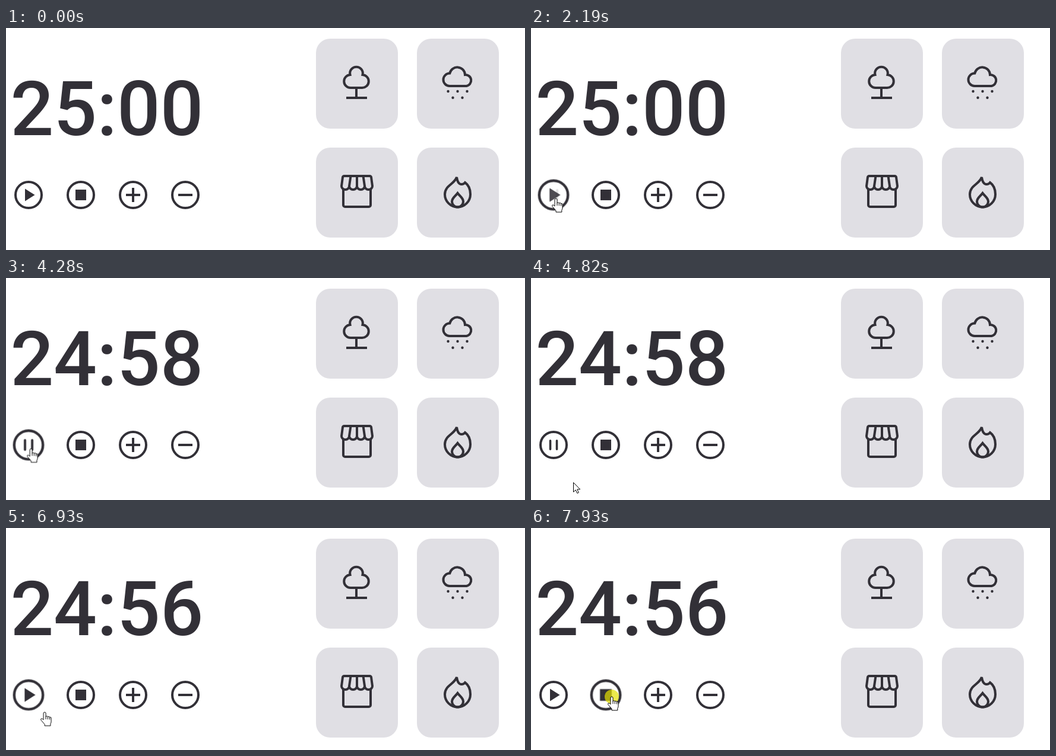
An HTML page for the animation above (8000 ms loop, 874 px wide and 375 px high).

```html
<!DOCTYPE html>
<html lang="en">
<head>
<meta charset="utf-8">
<title>Focus timer</title>
<style>
  html, body { margin: 0; width: 100%; height: 100%; overflow: hidden; background: #fff; }
  svg { display: block; width: 874px; height: 375px; }
  .ink { fill: #323037; }
  .line { fill: none; stroke: #323037; stroke-width: 4; }
  .card { fill: #e0dfe4; }
  .time text { font: 500 128px Roboto, sans-serif; text-anchor: middle; visibility: hidden; }
  .pointer path { fill: #fff; stroke: #000; stroke-width: 1; stroke-linejoin: round; }

  .anim { animation: 8s linear infinite; }
  .step { animation: 8s step-end infinite; visibility: hidden; }

  /* clock ticks */
  .t00 { animation-name: t00; }
  .t59 { animation-name: t59; }
  .t58 { animation-name: t58; }
  .t57 { animation-name: t57; }
  .t56 { animation-name: t56; }
  @keyframes t00 { 0% { visibility: visible } 39.25%, 100% { visibility: hidden } }
  @keyframes t59 { 0% { visibility: hidden } 39.25% { visibility: visible } 51.375%, 100% { visibility: hidden } }
  @keyframes t58 { 0% { visibility: hidden } 51.375% { visibility: visible } 63.75%, 100% { visibility: hidden } }
  @keyframes t57 { 0% { visibility: hidden } 63.75% { visibility: visible } 76.25%, 100% { visibility: hidden } }
  @keyframes t56 { 0% { visibility: hidden } 76.25%, 100% { visibility: visible } }

  /* button hover */
  .hover-play { animation-name: hover-play; animation-timing-function: ease; }
  .hover-stop { animation-name: hover-stop; animation-timing-function: ease; }
  @keyframes hover-play {
    0%, 16.625% { transform: scale(1) }
    20.375%, 55.75% { transform: scale(1.1) }
    59.5%, 69.125% { transform: scale(1) }
    72.875%, 86.625% { transform: scale(1.1) }
    90.375%, 100% { transform: scale(1) }
  }
  @keyframes hover-stop {
    0%, 93.75% { transform: scale(1) }
    97.5%, 100% { transform: scale(1.1) }
  }

  /* play / pause swap */
  .play { animation-name: play; }
  .pause { animation-name: pause; }
  @keyframes play { 0%, 26.875% { opacity: 1 } 30.625%, 75.875% { opacity: 0 } 79.625%, 100% { opacity: 1 } }
  @keyframes pause { 0%, 26.875% { opacity: 0 } 30.625%, 75.875% { opacity: 1 } 79.625%, 100% { opacity: 0 } }

  /* pointer */
  .pointer { animation-name: travel; }
  @keyframes travel {
    0%, 8.24% { transform: translate(640px, 400px) }
    8.25% { transform: translate(625px, 368px); animation-timing-function: cubic-bezier(.3, .2, .5, 1) }
    17.375% { transform: translate(45px, 305px) }
    18.125% { transform: translate(44px, 301px); animation-timing-function: ease-out }
    20.625% { transform: translate(42px, 288px) }
    53.125% { transform: translate(42px, 288px); animation-timing-function: ease-in-out }
    60.25% { transform: translate(71px, 345px) }
    64.125% { transform: translate(71px, 345px); animation-timing-function: ease-in-out }
    72.5% { transform: translate(52px, 290px) }
    84.375% { transform: translate(52px, 290px); animation-timing-function: ease-in }
    86.625% { transform: translate(65px, 311px) }
    89% { transform: translate(80px, 329px) }
    91.875% { transform: translate(112px, 319px) }
    94.375% { transform: translate(133px, 303px); animation-timing-function: ease-out }
    96.875%, 100% { transform: translate(136px, 285px) }
  }
  .hand { animation-name: hand; }
  .arrow { animation-name: arrow; }
  .press { animation-name: press; fill: rgba(228, 223, 0, .7); }
  @keyframes hand {
    0% { visibility: hidden } 16.75% { visibility: visible }
    55.75% { visibility: hidden } 69.125% { visibility: visible }
    87% { visibility: hidden } 93.75%, 100% { visibility: visible }
  }
  @keyframes arrow {
    0% { visibility: visible } 16.75% { visibility: hidden }
    55.75% { visibility: visible } 69.125% { visibility: hidden }
    87% { visibility: visible } 93.75%, 100% { visibility: hidden }
  }
  @keyframes press {
    0% { visibility: hidden } 25.625% { visibility: visible }
    26.875% { visibility: hidden } 74.125% { visibility: visible }
    75.75% { visibility: hidden } 99.125%, 100% { visibility: visible }
  }
</style>
</head>
<body>
<svg viewBox="0 0 874 375">
  <defs>
    <rect id="card" class="card" width="138" height="152" rx="24"/>
    <circle id="ring" class="line" r="22"/>
  </defs>

  <g class="time ink">
    <text class="step t00" x="170" y="180.5">25:00</text>
    <text class="step t59" x="170" y="180.5">24:59</text>
    <text class="step t58" x="170" y="180.5">24:58</text>
    <text class="step t57" x="170" y="180.5">24:57</text>
    <text class="step t56" x="170" y="180.5">24:56</text>
  </g>

  <g transform="translate(38 282)">
    <g class="anim hover-play">
      <use href="#ring"/>
      <path class="ink anim play" d="M-6-10.5V10.5L10.5 0Z"/>
      <path class="line anim pause" style="stroke-width:3.6;stroke-linecap:round" d="M-5.5-7.2V7.2M5.5-7.2V7.2"/>
    </g>
  </g>
  <g transform="translate(126 282)">
    <g class="anim hover-stop">
      <use href="#ring"/>
      <rect class="ink" x="-9" y="-9" width="18" height="18"/>
    </g>
  </g>
  <g transform="translate(214 282)">
    <use href="#ring"/>
    <path class="line" d="M-12 0H12M0-12V12"/>
  </g>
  <g transform="translate(302 282)">
    <use href="#ring"/>
    <path class="line" d="M-12 0H12"/>
  </g>

  <use href="#card" x="522" y="18"/>
  <use href="#card" x="692" y="18"/>
  <use href="#card" x="522" y="202"/>
  <use href="#card" x="692" y="202"/>

  <!-- tree -->
  <path class="line" d="M581 101A11 11 0 0 1 579.5 79A10.8 10.8 0 1 1 600.5 79A11 11 0 0 1 599 101ZM590 101V118M573 118H608"/>

  <!-- snow cloud -->
  <path class="line" d="M747 98A10.7 10.7 0 0 1 747.3 76.6A13 13 0 0 1 773 79A9.6 9.6 0 0 1 775.5 98Z"/>
  <g class="ink">
    <circle cx="744.5" cy="107" r="2.2"/>
    <circle cx="760.5" cy="107" r="2.2"/>
    <circle cx="776.5" cy="107" r="2.2"/>
    <circle cx="752.5" cy="117.8" r="2.2"/>
    <circle cx="768.5" cy="117.8" r="2.2"/>
  </g>

  <!-- shop -->
  <g class="line" stroke-linejoin="round">
    <path d="M568 271V299a3 3 0 0 0 3 3h40a3 3 0 0 0 3-3V271"/>
    <path d="M569.5 250h43q2 0 2.5 2l2 15a6.5 6 0 0 1-13 0a6.5 6 0 0 1-13 0a6.5 6 0 0 1-13 0a6.5 6 0 0 1-13 0l2-15q.5-2 2.5-2Z"/>
    <path d="M580.5 250L578 267M591 250V267M601.5 250L604 267"/>
  </g>

  <!-- fire -->
  <path class="line" d="M759 252C760 259 762 264 767 264Q771 264 773 261C780 266 782 275 782 281A21.5 21.5 0 0 1 739 281C739 266 755 264 759 252Z"/>
  <path class="line" d="M760.5 279C757 284 751 287 751 293A9.5 9.5 0 0 0 770 293C770 287 764 284 760.5 279Z"/>

  <g class="anim pointer">
    <circle class="step press" r="12"/>
    <path class="step arrow" d="M.5.5V16.5L4.2 13L6.8 18.6L9.3 17.5L6.8 12H11.7Z"/>
    <g class="step hand">
      <path d="M-2 13V2a2 2 0 0 1 4 0v6q0-1.3 1.6-1.3T5.3 8.2q.2-1 1.6-.9T8.5 9q.3-.8 1.4-.6T11 10v6q0 2-1.2 3.5V23H0v-2.5L-6 13.5q-1-1.5 0-2.3t2.2 0Z"/>
      <path d="M2 8v4M5.3 8.2v4M8.5 9v3.5"/>
    </g>
  </g>
</svg>
</body>
</html>
```
